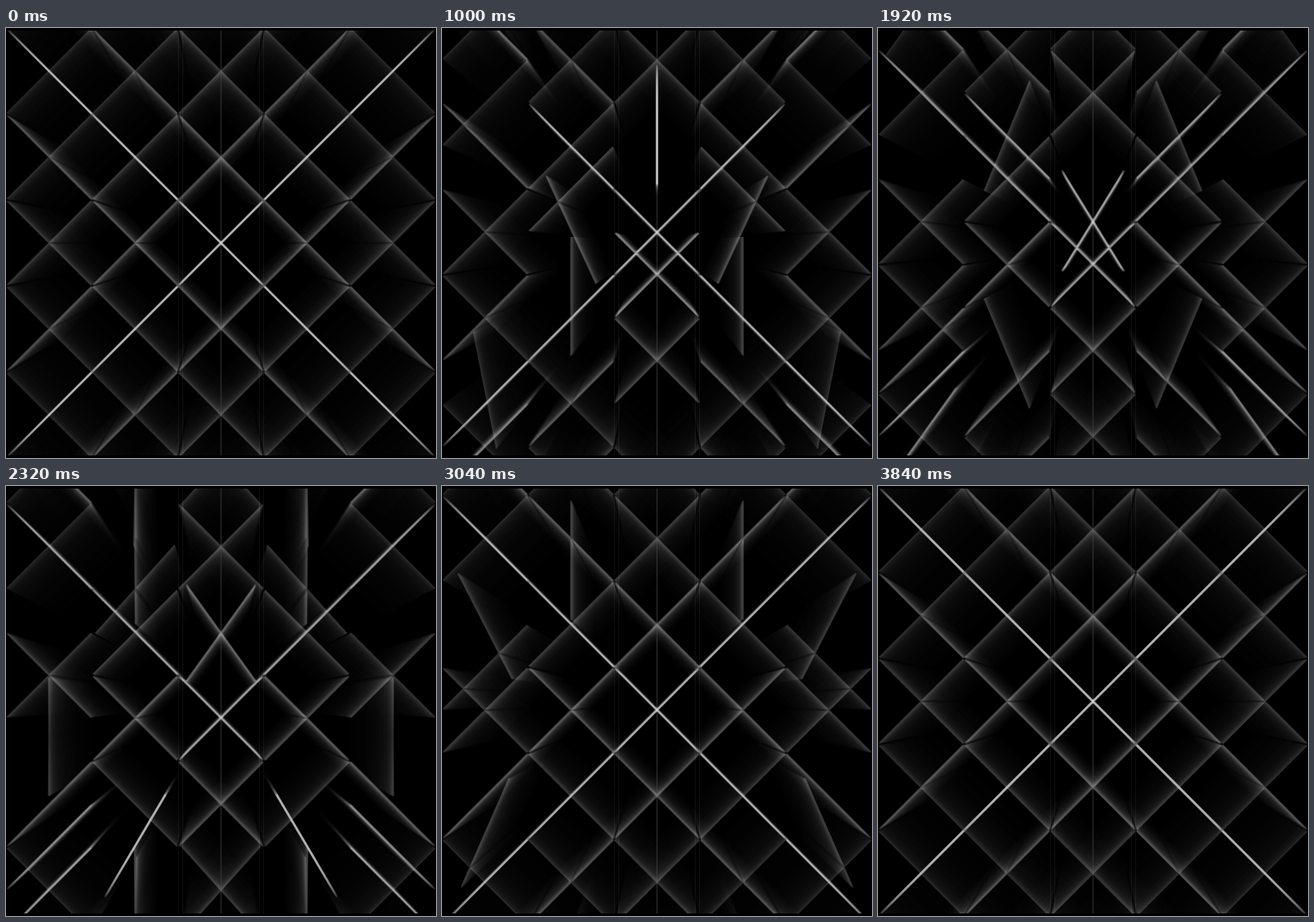
An HTML page with a canvas that plays this animation: 500 by 500 pixels, repeating every 3.88 s.

```html
<!DOCTYPE html>
<html lang="en">
<head>
<meta charset="utf-8">
<title>Turning walls</title>
<style>
html, body { margin: 0; width: 100%; height: 100%; overflow: hidden; background: #000; }
canvas { display: block; width: 500px; height: 500px; }
</style>
</head>
<body>
<canvas id="stage" width="500" height="500"></canvas>
<script>
const ctx = document.getElementById('stage').getContext('2d');
const SIZE = 500, CELL = 100, MID = SIZE / 2;
const LOOP = 3880, TURN = 600;
const LAYERS = 30, DEPTH = 0.24;
const HALF = CELL / Math.SQRT2 - 1.5;

// Each strand: column centre, resting angle, and per row the start of its hop.
// A swapped row flips to the other diagonal; a sway tips a wall without a hop.
const strands = [
  { x: 50, angle: 45, hops: [30, 1330, 2570, 2000, 750], swapped: 4 },
  { x: 50, angle: 135, hops: [93, 93, 3250, 2000, 2850], swapped: 4, sway: { row: 0, start: 1410 } },
  { x: 150, angle: 45, hops: [2000, 2000, 860, 700, 1470] },
  { x: 150, angle: 135, hops: [2050, 2740, 93, 1320, 2205], sway: { row: 1, start: 1770 } },
  { x: 250, angle: 45, hops: [1320, 700, 1810, 93, 93], sway: { row: 0, start: 2270 } }
];

const progress = (time, start) => Math.max(0, Math.min(1, (time - start) / TURN));
const smooth = v => v * v * (3 - 2 * v);
const tip = v => Math.sin(Math.PI * v) ** 2;

function wallsAt(time) {
  const walls = [];
  const drift = CELL / 2 * time / LOOP;
  for (const { x, angle, hops, swapped, sway } of strands) {
    hops.forEach((start, row) => {
      const turn = progress(time, start);
      let lean = row === swapped ? 2 * smooth(turn) : tip(turn);
      if (sway && sway.row === row) lean += tip(progress(time, sway.start));
      const a = (angle + (90 - angle) * lean) * Math.PI / 180;
      const y = CELL * (row + 0.5) - drift - CELL / 2 * smooth(smooth(turn));
      const dx = HALF * Math.cos(a), dy = HALF * Math.sin(a);
      for (const wrap of [-SIZE, 0, SIZE]) {
        const cy = y + wrap;
        if (cy < -CELL || cy > SIZE + CELL) continue;
        walls.push([x - dx, cy - dy, x + dx, cy + dy]);
        walls.push([SIZE - x + dx, cy - dy, SIZE - x - dx, cy + dy]);
      }
    });
  }
  return walls;
}

function strokeWalls(walls, scale, alpha, width) {
  const p = v => MID + (v - MID) * scale;
  ctx.beginPath();
  for (const [x1, y1, x2, y2] of walls) {
    ctx.moveTo(p(x1), p(y1));
    ctx.lineTo(p(x2), p(y2));
  }
  ctx.lineWidth = width;
  ctx.strokeStyle = `rgba(255,252,252,${alpha})`;
  ctx.stroke();
}

function verticalLine(x, alpha) {
  ctx.fillStyle = `rgba(255,255,255,${alpha})`;
  ctx.fillRect(x, 3, 1, 494);
}

function draw(time) {
  ctx.globalCompositeOperation = 'source-over';
  ctx.fillStyle = '#000';
  ctx.fillRect(0, 0, SIZE, SIZE);
  ctx.save();
  ctx.beginPath();
  ctx.rect(1, 3, 498, 494);
  ctx.clip();
  ctx.globalCompositeOperation = 'lighter';
  const walls = wallsAt(time);
  // Receding copies pile up on radial walls and spread out on the others.
  for (let i = 1; i <= LAYERS; i++) {
    const k = i / LAYERS;
    strokeWalls(walls, 1 - DEPTH * k ** 1.5, 0.043 * (1 - k) ** 1.4 + 0.004, 2.6);
  }
  strokeWalls(walls, 1, 0.09, 1.2);
  verticalLine(249.5, 0.2);
  for (const x of [200, 205, 294, 299]) verticalLine(x, 0.05);
  ctx.restore();
}

function frame() {
  draw(Math.floor(performance.now() % LOOP / 40) * 40);
  requestAnimationFrame(frame);
}
frame();
</script>
</body>
</html>
```
